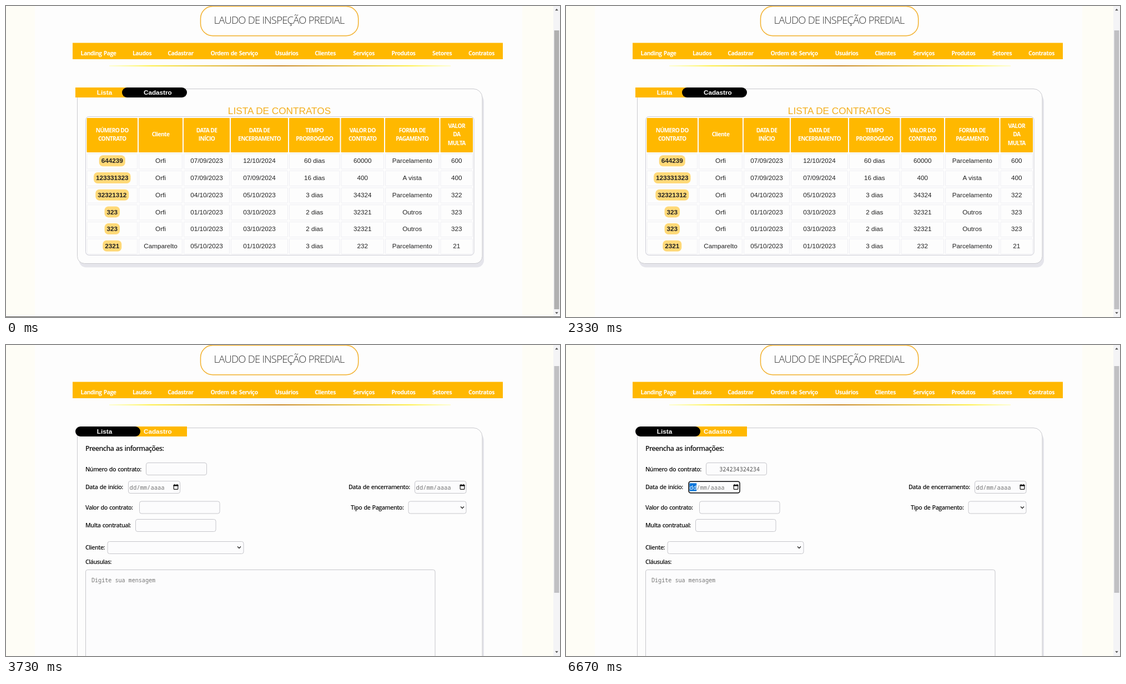
Recreate the animation shown at these times as an HTML page. Size 998 px wide and 561 px high, loop 8000 ms.

```html
<!DOCTYPE html>
<html lang="pt-BR">
<head>
<meta charset="utf-8">
<title>Laudo de Inspeção Predial</title>
<style>
html, body { margin: 0; width: 100%; height: 100%; overflow: hidden; background: #fefdf6; }
svg { display: block; width: 998px; height: 561px; }
text { font-family: "Open Sans", "Noto Sans", sans-serif; white-space: pre; }
.mid { text-anchor: middle; }
.end { text-anchor: end; }
.title { font-size: 18.5px; font-weight: 300; letter-spacing: -.78px; fill: #333; }
.nav { font-size: 10.4px; font-weight: 700; letter-spacing: -.5px; word-spacing: 1px; fill: #fff; }
.head { font-size: 10.2px; font-weight: 700; letter-spacing: -.6px; fill: #fff; }
.label { font-size: 10.7px; font-weight: 600; letter-spacing: -.5px; word-spacing: 1px; fill: #111; }
.lead { font-size: 12.3px; font-weight: 600; letter-spacing: -.55px; word-spacing: 1px; fill: #111; }
.cell, .num, .tab, .caption { font-family: "Liberation Sans", Arial, sans-serif; font-size: 11.7px; fill: #222; }
.num, .tab { font-weight: 700; }
.tab { fill: #fff; }
.caption { font-size: 17.2px; fill: #f3ae1c; }
.mono { font-family: "Noto Sans Mono", "Liberation Mono", monospace; font-size: 10.1px; fill: #757575; }
.date { font-size: 10.5px; }
.typed { fill: #555; }
</style>
</head>
<body>
<svg id="stage" viewBox="0 0 998 561"></svg>
<script>
const NS = 'http://www.w3.org/2000/svg';
const LOOP = 8000, GOLD = '#ffb800';
const stage = document.getElementById('stage');

function add(parent, tag, attrs, content) {
  const el = document.createElementNS(NS, tag);
  for (const k in attrs) el.setAttribute(k, attrs[k]);
  if (content !== undefined) el.textContent = content;
  parent.appendChild(el);
  return el;
}
const group = parent => add(parent, 'g', {});
const text = (p, x, y, s, cls) => add(p, 'text', { x, y, class: cls }, s);
const path = (p, d, attrs) => add(p, 'path', { d, fill: 'none', ...attrs });
const box = (p, x, y, x2, y2, fill, attrs) =>
  add(p, 'rect', { x, y, width: x2 - x, height: y2 - y, fill, ...attrs });
const show = (el, on) => el.setAttribute('visibility', on ? 'visible' : 'hidden');

// Page frame
box(stage, 52, 0, 930, 561, '#fdfdfd');
const grad = add(add(stage, 'defs', {}), 'linearGradient', { id: 'rule' });
[[0, '#ffff70', .3], [.12, '#fff04a', 1], [.5, '#c98a2b', 1], [.88, '#fff04a', 1], [1, '#ffff70', .3]]
  .forEach(([offset, color, alpha]) =>
    add(grad, 'stop', { offset, 'stop-color': color, 'stop-opacity': alpha }));

box(stage, 350.5, .5, 634.7, 53.7, '#fefefe', { rx: 22, stroke: '#f2b02c', 'stroke-width': 1.5 });
text(stage, 492, 32.3, 'LAUDO DE INSPEÇÃO PREDIAL', 'title mid');
box(stage, 120, 66.5, 895, 96, GOLD);
[['Landing Page', 166.5], ['Laudos', 245], ['Cadastrar', 314.5], ['Ordem de Serviço', 411],
 ['Usuários', 505.5], ['Clientes', 575], ['Serviços', 644.5], ['Produtos', 716],
 ['Setores', 785.5], ['Contratos', 856.5]]
  .forEach(([s, x]) => text(stage, x, 88.6, s, 'nav mid'));
box(stage, 186, 107, 801, 109, 'url(#rule)');

function card(parent, bottom) {
  const shape = 'M128.5 149.5H842a16 16 0 0 1 16 16V' + (bottom - 13) +
    'a13 13 0 0 1 -13 13H141.5a13 13 0 0 1 -13 -13Z';
  path(parent, shape, { fill: '#e5e5eb', transform: 'translate(3 7)' });
  path(parent, shape, { fill: '#fdfdfd', stroke: '#cacace', 'stroke-width': 1 });
}

// Contract list
const list = group(stage);
card(list, 464.5);
text(list, 492.5, 195, 'LISTA DE CONTRATOS', 'caption mid');
box(list, 143.5, 199.5, 843, 449.5, 'none', { rx: 6, stroke: '#cdcdd6' });

const columns = [
  [145.5, 237, 'NÚMERO DO|CONTRATO'], [239, 318, 'Cliente'], [320, 403, 'DATA DE|INÍCIO'],
  [405, 508, 'DATA DE|ENCERRAMENTO'], [510, 601.5, 'TEMPO|PRORROGADO'],
  [603.5, 681, 'VALOR DO|CONTRATO'], [683, 780.5, 'FORMA DE|PAGAMENTO'], [782.5, 841, 'VALOR|DA|MULTA']
];
const rows = [
  '644239|Orfi|07/09/2023|12/10/2024|60 dias|60000|Parcelamento|600',
  '123331323|Orfi|07/09/2023|07/09/2024|16 dias|400|A vista|400',
  '32321312|Orfi|04/10/2023|05/10/2023|3 dias|34324|Parcelamento|322',
  '323|Orfi|01/10/2023|03/10/2023|2 dias|32321|Outros|323',
  '323|Orfi|01/10/2023|03/10/2023|2 dias|32321|Outros|323',
  '2321|Camparelto|05/10/2023|01/10/2023|3 dias|232|Parcelamento|21'
].map(r => r.split('|'));

columns.forEach(([x, x2, name], c) => {
  const mid = (x + x2) / 2, lines = name.split('|');
  box(list, x, 202, x2, 264, GOLD, { rx: 1 });
  lines.forEach((s, i) => text(list, mid, 235.3 + (i - (lines.length - 1) / 2) * 15.3, s, 'head mid'));
  rows.forEach((row, r) => {
    const y = 266 + r * 30.7;
    box(list, x + .5, y + .5, x2 - .5, y + 28, 'none', { rx: 1, stroke: '#eeeef3' });
    if (c === 0) {
      const half = row[0].length * 3.25 + 4;
      box(list, mid - half, y + 3.3, mid + half, y + 23.3, '#ffd978', { rx: 7 });
    }
    text(list, mid, y + 17.4, row[c], (c ? 'cell' : 'num') + ' mid');
  });
});

// Registration form
const form = group(stage);
card(form, 640);
[['Preencha as informações:', 143, 191, 'lead'],
 ['Número do contrato:', 143, 227.7], ['Data de início:', 143, 260],
 ['Data de encerramento:', 617, 260], ['Valor do contrato:', 143, 297],
 ['Tipo de Pagamento:', 621, 296.5], ['Multa contratual:', 143, 329],
 ['Cliente:', 143, 369.3], ['Cláusulas:', 143, 395]]
  .forEach(([s, x, y, cls]) => text(form, x, y, s, cls || 'label'));

[[252.5, 212.5, 361.5, 234.5], [220.5, 245.5, 313.5, 267.5], [736.5, 245.5, 829, 267.5],
 [240.5, 282, 385, 304], [725, 282, 829, 304], [233.5, 314.5, 378, 336.5],
 [183, 354.5, 428, 376.5], [143.5, 405.5, 773, 580]]
  .forEach(b => box(form, ...b, '#fcfcfd', { rx: 3.5, stroke: '#c6c6cb' }));

[[417, 363.5], [819, 291.5]].forEach(([x, y]) =>
  path(form, `M${x} ${y}l3 3l3 -3`, { stroke: '#222', 'stroke-width': 1.3 }));

function dateField(x) {
  text(form, x, 260.6, 'dd/mm/aaaa', 'mono date');
  box(form, x + 79.6, 252.5, x + 87.2, 260.3, 'none', { rx: .8, stroke: '#111', 'stroke-width': 1.2 });
  box(form, x + 79, 252, x + 87.8, 254.6, '#111');
  box(form, x + 80.6, 250.8, x + 81.8, 253, '#111');
  box(form, x + 85, 250.8, x + 86.2, 253, '#111');
}
dateField(222.6);
dateField(738.6);
text(form, 154, 427.6, 'Digite sua mensagem', 'mono');
const typed = text(form, 349, 227.7, '', 'mono typed end');

const outline = { rx: 3.5, stroke: '#111', 'stroke-width': 1.5 };
const numFocus = group(form);
box(numFocus, 252.6, 213.2, 361, 234, 'none', outline);
path(numFocus, 'M351.3 222l2.7 -3.2l2.7 3.2ZM351.3 224.8l2.7 3.2l2.7 -3.2Z', { fill: '#444' });
const caret = box(form, 348.7, 217.8, 349.5, 229.8, '#333');

const dateFocus = group(form);
box(dateFocus, 221.2, 246.3, 313, 266.8, 'none', outline);
box(dateFocus, 222.4, 249.3, 235.2, 263.6, '#0a74d8');
text(dateFocus, 222.6, 260.6, 'dd', 'mono date').style.fill = '#fff';

// Tabs
const tabs = group(stage);
const makeTab = (x, name, mid) => {
  const g = group(tabs);
  return { g, plate: box(g, x, 147, x + 117, 165, GOLD), label: text(g, mid, 160, name, 'tab mid') };
};
const listTab = makeTab(125, 'Lista', 177.5);
const formTab = makeTab(209, 'Cadastro', 273.3);

function paintTab(tab, k) {
  tab.plate.setAttribute('fill', `rgb(${Math.round(255 * (1 - k))},${Math.round(184 * (1 - k))},0)`);
  tab.plate.setAttribute('rx', Math.min(9, 16 * k));
}

// Scrollbar
box(stage, 986, 0, 998, 561, '#f4f4f6');
const thumb = box(stage, 987.5, 44, 996.5, 547, '#a8a8a8');
path(stage, 'M989.2 8.2l2.8 -3.4l2.8 3.4Z', { fill: '#555' });
path(stage, 'M989.2 552.2l2.8 3.4l2.8 -3.4Z', { fill: '#555' });
const edge = box(stage, 0, 560, 998, 561, '#555');

// Timeline
const NUMBER = '324234324234';
const SWITCH = 2700, TAB_START = 3125, TAB_TIME = 500;
const LEAVE_BAR = 1200;
const keys = [5000, 5000, 5000, 5035, 5075, 5110, 5150, 5190, 5230, 5370, 5420, 5470];
const within = (t, a, b) => t >= a && t < b;

// CSS "ease" curve, solved by bisection
function ease(p) {
  if (p <= 0 || p >= 1) return p <= 0 ? 0 : 1;
  const bez = (a, b, u) => 3 * a * u * (1 - u) ** 2 + 3 * b * u * u * (1 - u) + u ** 3;
  let lo = 0, hi = 1;
  for (let i = 0; i < 24; i++) {
    const u = (lo + hi) / 2;
    if (bez(.25, .25, u) < p) lo = u; else hi = u;
  }
  return bez(.1, 1, lo);
}

let front = null;
function raise(tab) {
  if (front !== tab) tabs.appendChild((front = tab).g);
}

function draw(t) {
  const onForm = t >= SWITCH, swapped = t >= TAB_START;
  show(list, !onForm);
  show(form, onForm);
  paintTab(listTab, ease((t - TAB_START) / TAB_TIME));
  paintTab(formTab, swapped ? 0 : 1);
  raise(swapped ? listTab : formTab);

  thumb.setAttribute('y', onForm ? 38 : 44);
  thumb.setAttribute('height', onForm ? 409 : 503);
  thumb.setAttribute('fill', t < LEAVE_BAR ? '#b0b0b0' : '#c0c0c3');
  show(edge, t < LEAVE_BAR);

  // Visibility must stay inherited inside the hidden form
  typed.textContent = NUMBER.slice(0, keys.filter(k => t >= k).length);
  show(numFocus, within(t, 4300, 6530));
  show(caret, within(t, 4300, 4530) || within(t, 5000, 5970));
  show(dateFocus, t >= 6530);
}

const start = performance.now();
function tick() {
  draw((performance.now() - start) % LOOP);
  requestAnimationFrame(tick);
}
tick();
</script>
</body>
</html>
```
